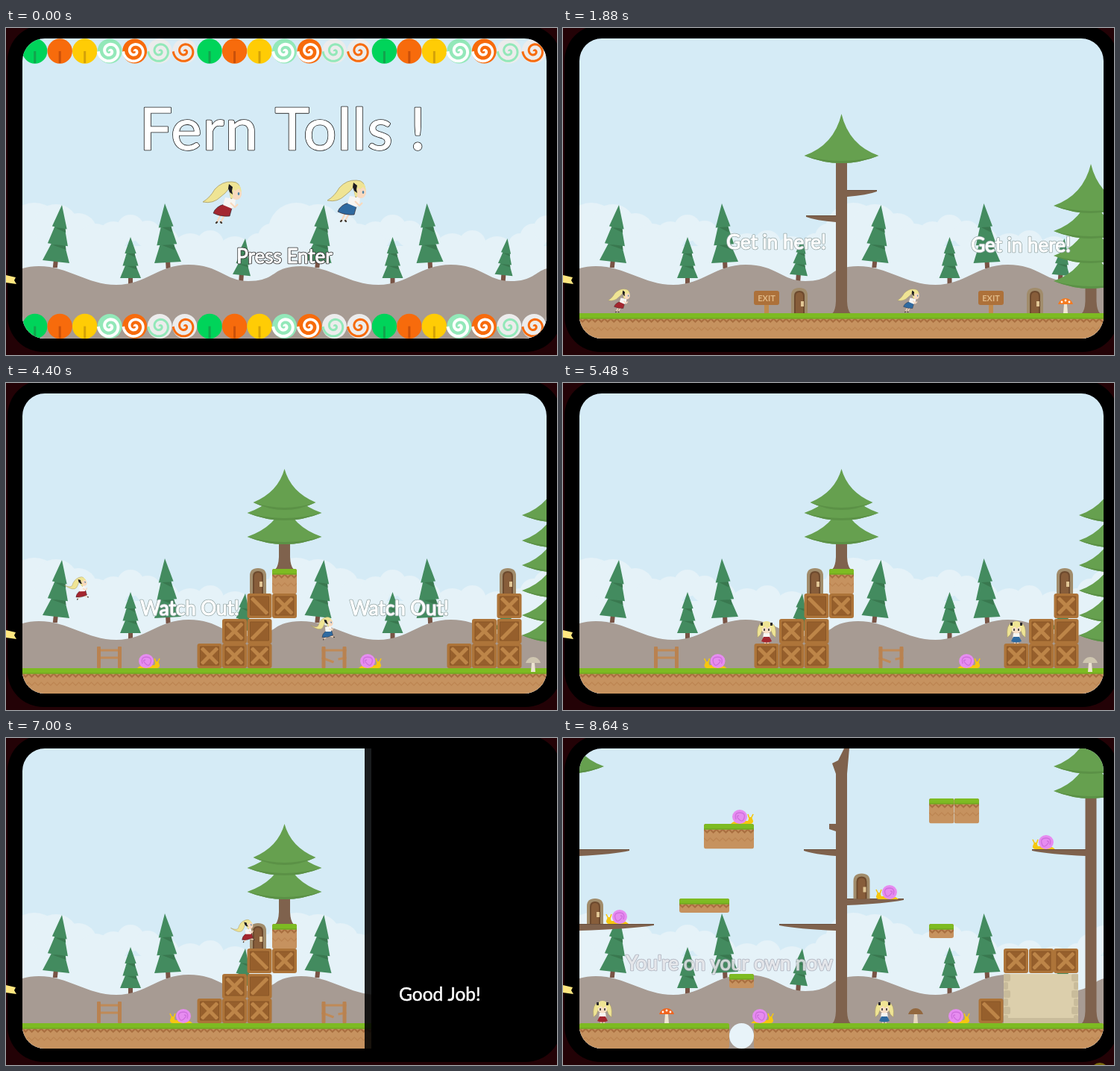
Recreate the animation shown at these times as an HTML page with a canvas. Size 739x438 px, loop 8660 ms.

```html
<!DOCTYPE html>
<html lang="en">
<head>
<meta charset="utf-8">
<title>Fern Tolls</title>
<style>
html, body { margin: 0; width: 100%; height: 100%; overflow: hidden; background: #230206; }
canvas { display: block; }
</style>
</head>
<body>
<canvas width="739" height="438"></canvas>
<script>
const g = document.querySelector('canvas').getContext('2d');
const LOOP = 8660, TILE = 33.5;
const clamp = (v, lo = 0, hi = 1) => Math.min(hi, Math.max(lo, v));

function fill(color, path) { g.fillStyle = color; g.fill(new Path2D(path)); }
function line(color, width, path) {
  g.strokeStyle = color; g.lineWidth = width;
  g.stroke(new Path2D(path));
}
function box(color, x, y, w, h, r = 0) {
  g.fillStyle = color; g.beginPath(); g.roundRect(x, y, w, h, r); g.fill();
}
function oval(color, x, y, rx, ry = rx) {
  g.fillStyle = color; g.beginPath(); g.ellipse(x, y, rx, ry, 0, 0, 7); g.fill();
}
function at(x, y, draw, sx = 1, sy = sx, turn = 0) {
  g.save(); g.translate(x, y); g.rotate(turn); g.scale(sx, sy); draw(); g.restore();
}
function label(text, x, y, size, { edge, align = 'center', alpha = 1, spacing = 0 } = {}) {
  if (alpha <= 0) return;
  g.save();
  g.globalAlpha = alpha;
  g.font = `${size}px Lato, sans-serif`;
  g.letterSpacing = spacing + 'px';
  g.textAlign = align;
  g.lineJoin = 'round';
  g.fillStyle = g.strokeStyle = '#fff';
  if (edge) {
    g.strokeStyle = edge; g.lineWidth = 2.6; g.strokeText(text, x, y);
    g.strokeStyle = '#fff'; g.lineWidth = 1;
  } else g.lineWidth = .5;
  g.strokeText(text, x, y);
  g.fillText(text, x, y);
  g.restore();
}

// Backdrop
function pine(tipX, tipY, baseX, baseY, half) {
  const lean = baseX - tipX, h = baseY - tipY, tilt = -lean * .25;
  const onAxis = k => [tipX + lean * k, tipY + h * k];
  line('#795445', 6, `M${baseX} ${baseY - 3}l${lean * .15} 11`);
  for (const [top, bottom, width] of [[.66, 1, 1], [.36, .7, .75], [0, .4, .55]]) {
    const [tx, ty] = onAxis(top), [bx, by] = onAxis(bottom);
    const w = half * width, tw = top ? w * .45 : 0;
    fill('#438b5f', `M${tx - tw} ${ty}H${tx + tw}L${bx + w} ${by + tilt}L${bx - w} ${by - tilt}Z`);
    if (top) fill('#39784f', `M${tx - tw} ${ty + h * .04}H${tx + w * .55}L${tx + w * .6} ${ty + h * .13}Z`);
  }
}
const clouds = [[16, 234, 38], [45, 236, 30], [75, 248, 25], [98, 262, 25], [122, 259, 20], [145, 250, 18],
  [168, 258, 18], [190, 267, 20], [225, 275, 25], [252, 271, 18], [285, 279, 25], [316, 275, 16], [334, 262, 18], [352, 251, 18]];
function backdrop() {
  box('#d5ebf6', 22, 14, 703, 402);
  for (const ox of [22, 373.5]) at(ox, 0, () => {
    for (const [x, top, r] of clouds) oval('#e5f2f8', x, top + r, r);
    box('#e5f2f8', 0, 292, 352, 124);
  });
  for (const ox of [22, 373.5]) at(ox, 0, () => {
    pine(53, 237, 45, 313, 18);
    pine(145, 280, 145, 335, 14);
    pine(191, 235, 195, 314, 18);
    pine(299, 282, 294, 331, 12);
    fill('#a79b93', 'M0 322Q10 319 22 319C62 319 86 344 126 344S182 317 223 317S272 339 303 339S336 326 352 322V416H0Z');
  });
}

// Scenery
function trunk(x, top, foot = 382) {
  fill('#7f624d', `M${x - 7.5} ${top}H${x + 7.5}V${foot - 16}Q${x + 8} ${foot - 4} ${x + 12} ${foot}H${x - 12}Q${x - 8} ${foot - 4} ${x - 7.5} ${foot - 16}Z`);
}
function branch(x, tip, y) {
  fill('#7f624d', `M${x} ${y}H${tip}V${y + 2}Q${(x + tip * 2) / 3} ${y + 7} ${x} ${y + 9}Z`);
  line('#6b503e', 1, `M${x} ${y + .5}H${tip}`);
}
function leaves(x, tips, half = 50, rise = 50) {
  for (const tip of [...tips].reverse()) {
    const l = x - half, r = x + half;
    fill('#66a04f', `M${x} ${tip - rise}Q${x - half * .2} ${tip - 14} ${l} ${tip}Q${x} ${tip + 20} ${r} ${tip}Q${x + half * .2} ${tip - 14} ${x} ${tip - rise}`);
    fill('#5b9146', `M${l} ${tip}Q${x} ${tip + 20} ${r} ${tip}Q${x} ${tip + 14} ${l} ${tip}`);
  }
}
function zigzag(x, y, w, step = 8.4) {
  let d = `M${x} ${y}`;
  for (let i = 0; i * step < w; i++) d += `l${step / 2} 4l${step / 2} -4`;
  return d;
}
function soil(x, y, w, h = TILE, r = 3) {
  g.save();
  g.beginPath(); g.roundRect(x, y, w, h, r); g.clip();
  box('#c6925f', x, y, w, h);
  fill('#a96f40', zigzag(x, y + 9, w) + `V${y}H${x}Z`);
  fill('#c6925f', zigzag(x, y + 6, w) + `V${y}H${x}Z`);
  if (h > 25) line('#bd8653', 1.5, zigzag(x, y + 19, w));
  box('#7dbb22', x, y, w, 7.5);
  box('#72a822', x, y + 6, w, 1.5);
  g.restore();
}
function crate(x, y, kind = 'X') {
  at(x, y, () => {
    box('#ad7439', 0, 0, 33, 33, 3);
    box('#965f2c', 4, 4, 25, 25, 1);
    if (kind !== '/') line('#bd8548', 5, 'M6 6L27 27');
    if (kind !== '\\') line('#bd8548', 5, 'M27 6L6 27');
    line('#8a5727', 1, 'M4 4H29V29H4Z');
  });
}
function door(x, foot) {
  at(x, foot, () => {
    fill('#a18c6b', 'M-11 0V-24Q-11 -34 0 -34T11 -24V0Z');
    fill('#6d4a2e', 'M-7 0V-23Q-7 -30 0 -30T7 -23V0Z');
    fill('#875d3a', 'M-5 0V-22Q-5 -28 0 -28T5 -22V0Z');
    box('#e0c594', 2, -16, 4, 7);
  });
}
function sign(x) {
  box('#c08a4c', x - 3, 366, 6, 16);
  box('#ad713a', x - 17, 352, 34, 19, 3);
  g.font = 'bold 11px Lato, sans-serif';
  g.textAlign = 'center'; g.fillStyle = '#e0b987';
  g.fillText('EXIT', x, 366);
}
function mushroom(x, cap, stem, dots) {
  fill(stem, `M${x - 2} 370H${x + 2}L${x + 3} 382H${x - 3}Z`);
  fill(cap, `M${x - 10} 370Q${x - 7} 362 ${x} 362T${x + 10} 370Z`);
  if (dots) for (const d of [-5, 0, 5]) oval('#fff', x + d, 366 + (d ? 1 : -1), 1.4);
}
function fence(x, broken) {
  for (const y of [358, 368]) line('#c08a57', 3, broken && y > 360 ? `M${x} ${y}L${x + 16} ${y + 6}M${x + 22} ${y + 2}L${x + 33} ${y}` : `M${x} ${y}H${x + 33}`);
  box('#b98250', x, 353, 5, 29, 1);
  box('#b98250', x + 28, 353, 5, 29, 1);
}

// Characters
function snail(x, foot, dir) {
  at(x, foot, () => {
    fill('#f6c70f', 'M-15 0Q-10 -5 0 -4L8 -4L10 -9H13L15 -4Q15 0 11 0Z');
    line('#f6c70f', 1.6, 'M10 -7L8 -13M12 -7L15 -13');
    oval('#e68cf0', -3, -9.5, 10, 9.5);
    line('#cf6fdd', 1.3, 'M-8 -6Q-11 -15 -3 -15T3 -8T-4 -6T-4 -11');
  }, dir, 1);
}
// Walks back and forth between lo and hi, passing x at time t0.
function patrol(t, t0, x, dir, lo, hi, speed, foot) {
  const span = hi - lo, from = dir > 0 ? x - lo : 2 * span - (x - lo);
  const p = (((from + speed * (t - t0)) % (2 * span)) + 2 * span) % (2 * span);
  snail(lo + (p < span ? p : 2 * span - p), foot, p < span ? 1 : -1);
}
// Stride p runs from 0 (legs tucked, hair down) to 1 (legs apart, hair up).
function runner(skirt, p) {
  const hair = '#efe494', skin = '#f8d9bf', tip = -2 - 29 * p;
  const back = `${-7 - 4 * p} ${25 - 10 * p}`, front = `${-2 + 20 * p} ${25 - 4 * p}`;
  g.lineCap = 'round';
  line(skin, 2.4, `M-2 15L${back}M4 14L${front}`);
  line('#40382f', 2.4, `M${back}l-1 1M${front}l1 1`);
  g.lineCap = 'butt';
  const cloth = `M3 1L${13 + 3 * p} 6Q${11 + 4 * p} 13 ${10 + 5 * p} 17Q-2 18 -12 ${13 - 2 * p}Q-9 4 3 1Z`;
  fill(skirt, cloth);
  line('#33262b', .7, cloth);
  fill('#f7f5f2', 'M4 -8L18 -6L17 3L13 7L1 2Z');
  line(skin, 2.2, 'M11 -1L17 5L21 1');
  const mane = `M24 -16Q25 -29 13 -29Q0 -30 -10 ${-19 + 2 * p}Q-16 ${-8 - 8 * p} -26 ${tip}Q-12 ${1 - 6 * p} -2 -9Q5 -14 9 -20L12 -6Z`;
  fill(hair, mane);
  line('#a89b62', .8, mane);
  oval(skin, 19, -13, 7, 8);
  fill(hair, 'M11 -8Q8 -26 17 -27Q25 -26 26 -15L22 -20L18 -17L15 -19L14 -7Z');
  fill('#1d1b20', 'M9 -26L14 -22L13 -17L14 -12L10 -15L8 -20Z');
  oval('#4c84a8', 22, -13, 1.3, 2);
}
function standing(skirt) {
  const hair = '#efe494';
  line('#f3cfb4', 2, 'M-2 -5V0M2 -5V0');
  fill('#f7f5f2', 'M-4 -14H4L5 -7H-5Z');
  fill(skirt, 'M-4 -9H4L7 -3Q0 0 -7 -3Z');
  const tails = 'M-6 -27Q-14 -26 -12 -8L-8 -12L-5 -20ZM6 -27Q14 -26 12 -8L8 -12L5 -20Z';
  fill(hair, tails);
  line('#a89b62', .6, tails);
  oval(hair, 0, -22, 8, 8);
  oval('#f8dfc8', 0, -19, 6, 5.5);
  fill(hair, 'M-7 -19Q-7 -28 0 -28T7 -19L4 -23L1 -20L-2 -23Z');
  box('#2b2a2d', -8, -28, 3, 4); box('#2b2a2d', 5, -28, 3, 4);
  box('#55524a', -4, -20, 2, 3); box('#55524a', 2, -20, 2, 3);
}
// Keys are [time, x, foot, height of the hop to the next key].
function pose(t, keys) {
  let i = 0;
  while (i < keys.length - 2 && t >= keys[i + 1][0]) i++;
  const [t0, x0, y0, hop = 0] = keys[i], [t1, x1, y1] = keys[i + 1];
  const u = clamp((t - t0) / (t1 - t0));
  return { x: x0 + (x1 - x0) * u, y: y0 + (y1 - y0) * u - hop * 4 * u * (1 - u), hop, moving: u < 1 && (hop || x0 !== x1) };
}
function girl(t, skirt, { x, y, hop, moving }) {
  if (!moving) at(x, y, () => standing(skirt));
  else at(x, y - 16, () => runner(skirt, hop ? .8 : .5 - .5 * Math.cos(t / 50)), .56, .56, hop ? -.4 : 0);
}
const RED = '#a3262f', BLUE = '#2f6aa0';

// Scenes
function candy(x, y, kind) {
  at(x, y, () => {
    if (kind < 3) {
      oval(['#00d45a', '#f76b0c', '#ffcc05'][kind], 0, 0, 16.7);
      box(['#12a34c', '#c9500a', '#d3a108'][kind], -1.5, 0, 3, 16);
      return;
    }
    const [base, swirl, width] = [['#93e8b9', '#fff', 4], ['#f76b0c', '#fff', 3.6],
      ['#ececec', '#93e8b9', 3], ['#ececec', '#f76b0c', 3]][kind - 3];
    oval(base, 0, 0, 16.5);
    g.beginPath();
    for (let a = 0; a < 11.4; a += .2) g.lineTo(Math.cos(a - 2) * a * 1.35, Math.sin(a - 2) * a * 1.35);
    g.strokeStyle = swirl; g.lineWidth = width; g.stroke();
  });
}
function title(t) {
  backdrop();
  for (let i = 0; i < 21; i++) for (const y of [31, 399.5]) candy(22 + (i + .5) * 703 / 21, y, i % 7);
  label('Fern Tolls !', 179, 163, 78, { edge: '#222', align: 'left', spacing: 1.6 });
  const p = .5 - .5 * Math.cos(Math.PI * t / 188);
  at(290, 235, () => runner(RED, p));
  at(457, 233, () => runner(BLUE, p));
  label('Press Enter', 373.5, 315, 26, { edge: '#333' });
}

const walk1 = [[1780, 50, 382], [2000, 105, 382, 90], [2350, 190, 382], [2600, 252, 382], [2990, 222, 382, 52], [3290, 284, 382], [3350, 317, 382]];
function meadow(t) {
  backdrop();
  soil(22, 382, 703, 34, 0);
  trunk(373.5, 170); leaves(373.5, [171], 50, 56);
  branch(381, 421, 217); branch(366, 326, 251);
  trunk(708, 335); leaves(708, [238, 272, 305, 339], 50, 56);
  sign(273); sign(574);
  door(317, 382); door(633, 382);
  mushroom(674, '#f47a20', '#f0e6d2', true);
  const red = pose(t, walk1);
  girl(t, RED, red);
  girl(t, BLUE, { ...red, x: Math.min(red.x + 388, 641) });
  label('Get in here!', 286, 296, 26, { edge: '#9aa' });
  label('Get in here!', 614, 300, 26, { edge: '#9aa' });
}

const climb = dx => [[4700, 190 + dx, 382], [4900, 215 + dx, 382, 107], [5250, 273 + dx, 349], [5800, 273 + dx, 349, 105],
  [6150, 305 + dx, 316], [6800, 305 + dx, 316, 40], [7010, 321 + dx, 283], [7090, 338 + dx, 282]];
const walk2 = [[4100, 50, 382], [4260, 60, 382, 88], [4560, 140, 382], ...climb(0)];
const walk2b = [[4100, 380, 382], [4260, 390, 382, 34], [4560, 470, 382], ...climb(335)];
function stairs(t) {
  backdrop();
  soil(22, 382, 703, 34, 0);
  leaves(742, [177, 211, 244, 278, 311, 338], 50, 56);
  trunk(373.5, 205, 249);
  leaves(373.5, [174, 206], 50, 48); leaves(373.5, [160], 42, 45);
  soil(357, 249, 33); crate(357, 282);
  for (const dx of [0, 335]) {
    crate(323.5 + dx, 282, dx ? 'X' : '\\'); crate(290 + dx, 316); crate(323.5 + dx, 316, '/');
    for (let i = 0; i < 3; i++) crate(256.5 + dx + i * TILE, 349);
    door(338 + dx, 282);
  }
  fence(122); fence(423.5, true);
  at(0, 5, () => mushroom(707, '#cfc6b0', '#ece4d2'));
  patrol(t, 4400, 191, 1, 165, 241, .08, 382);
  patrol(t, 4400, 488, 1, 472, 576, .052, 382);
  girl(t, RED, pose(t, walk2));
  girl(t, BLUE, pose(t, walk2b));
  const alpha = 1 - clamp((t - 5000) / 400);
  for (const x of [246.5, 527.5]) label('Watch Out!', x, 311, 26, { edge: '#9aa', alpha });
}

const snails = [[240, 1, 204, 241, 115], [73, -1, 44, 107, 249], [435, -1, 396, 442, 216],
  [645, -1, 643, 686, 149], [267, 1, 256, 350, 382], [530, 1, 490, 543, 382]];
function heights(t) {
  backdrop();
  soil(22, 382, 201, 34); soil(256, 382, 469, 34);
  oval('#e8f3f9', 239.5, 399, 16.5, 17);
  leaves(5, [5, 38], 50, 56);
  branch(22, 89, 149); branch(22, 122, 249);
  trunk(373.5, 32);
  fill('#7f624d', 'M366 48L361 34L369 30L377 14H384L381 48ZM366 115H357V122L366 125Z');
  branch(366, 323, 149); branch(366, 290, 249); branch(381, 457, 215);
  trunk(708, 75); leaves(708, [5, 38, 71], 50, 56); branch(701, 629, 149);
  soil(189, 115, 67); soil(156, 215, 67, 19); soil(223, 316, 33, 19);
  soil(491, 81, TILE); soil(524.5, 81, TILE); soil(491, 249, 33, 19);
  box('#dccfac', 591, 316, 100, 66);
  for (let y = 316; y < 380; y += 11) {
    box('#c9bc9b', 591, y, y % 2 ? 6 : 9, 10, 2);
    box('#c9bc9b', y % 2 ? 685 : 682, y, y % 2 ? 6 : 9, 10, 2);
  }
  box('#c9bc9b', 591, 375, 100, 7);
  crate(591, 282); crate(625, 282); crate(658, 282); crate(557.5, 349, '\\');
  door(43, 249); door(400.5, 215.5);
  mushroom(139, '#f0641e', '#f0e6d2', true); mushroom(473, '#93683f', '#e6d6bd');
  for (const [x, dir, lo, hi, foot] of snails) patrol(t, 8640, x, dir, lo, hi, .05, foot);
  const red = pose(t, [[7400, 43, 382], [7700, 53, 382]]);
  girl(t, RED, red);
  girl(t, BLUE, { ...red, x: red.x + 378 });
  label("You're on your own now", 223, 311, 26, { edge: '#889', alpha: 1 - .4 * clamp((t - 8300) / 340) });
}

// Each curtain: close start, close end, open start, open end, text.
const curtains = [[859, 1063, 1265, 1470, 'loading'], [3250, 3455, 3900, 4105, 'Good Job!'], [6930, 7135, 7195, 7400, 'Good Job!']];
function curtain(t) {
  for (const [a, b, c, d, text] of curtains) {
    if (t < a || t > d) continue;
    const edge = 725 - 703 * (t < c ? clamp((t - a) / (b - a)) : 1 - clamp((t - c) / (d - c)));
    g.save();
    g.beginPath(); g.rect(Math.floor(edge), 14, 726 - Math.floor(edge), 402); g.clip();
    box('rgba(0,0,0,.88)', Math.floor(edge), 14, 9, 402);
    box('#000', Math.floor(edge) + 9, 14, 720, 402);
    g.beginPath(); g.rect(edge + 9, 14, 720, 402); g.clip();
    const alpha = t > b ? 1 - clamp((t - b - 75) / 120) : 1;
    label(text, 527, 352, 24.5, { align: 'left', alpha });
    g.restore();
  }
}

function draw(t) {
  box('#230206', 0, 0, 739, 438);
  box('#000', 2, -4, 743, 438, 48);
  fill('#ffe680', 'M0 331L13 334L11 338L14 343L0 341Z');
  if (t > 8100) oval('#7d6c10', 720, 454 - 7 * clamp((t - 8100) / 540), 12);
  g.save();
  g.beginPath(); g.roundRect(22, 14, 703, 402, 30); g.clip();
  (t < 1150 ? title : t < 3700 ? meadow : t < 7165 ? stairs : heights)(t);
  g.restore();
  curtain(t);
}
const start = performance.now();
function tick() {
  draw((performance.now() - start) % LOOP);
  requestAnimationFrame(tick);
}
tick();
</script>
</body>
</html>
```
